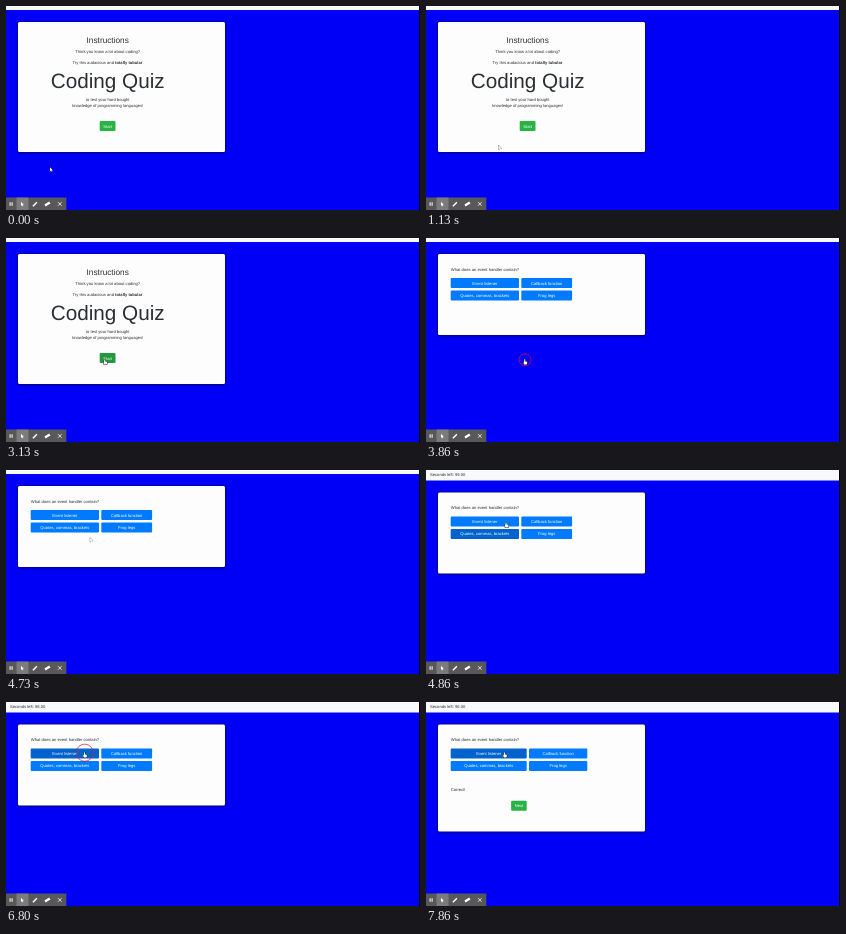
An HTML page with a canvas for the animation above (8000 ms loop, 414 by 204 pixels).

```html
<!DOCTYPE html>
<html lang="en">
<head>
<meta charset="utf-8">
<title>Coding quiz</title>
<style>
  html, body { margin: 0; width: 100%; height: 100%; overflow: hidden; background: #0000f7; }
  canvas { display: block; }
</style>
</head>
<body>
<canvas id="stage" width="414" height="204"></canvas>
<script>
const ctx = document.getElementById('stage').getContext('2d');
const LOOP = 8000;
const REM = 16 * 0.259;   // body text of the scaled-down page
const GREEN = '#28b444';

const START = 3860;       // start button released
const TICK = 4860;        // first countdown tick
const ANSWER = 6930;      // answer accepted
const OVER_START = 2200, OFF_START = 4560, OVER_ANSWER = 4740;

// Pointer moves: from, until, x, y
const moves = [
  [60, 260, 88, 120], [1060, 1200, 58, 158], [1530, 2000, 85.7, 123.7], [2050, 2330, 98.7, 121.3],
  [4530, 4820, 80, 52.3], [4930, 5580, 78, 48.3], [5660, 5860, 78.4, 50.3]
];

function pointerAt(t) {
  let x = 44, y = 161.2;
  for (const [from, until, toX, toY] of moves) {
    const k = Math.min(1, Math.max(0, (t - from) / (until - from)));
    const e = k * k * (3 - 2 * k);
    x += (toX - x) * e;
    y += (toY - y) * e;
  }
  return [x, y];
}

function text(str, x, y, { size = 1, color = '#2b2f33', align = 'left', weight = 400 } = {}) {
  ctx.font = `${weight} ${size * REM}px "Liberation Sans", Arial, sans-serif`;
  ctx.textRendering = 'geometricPrecision';
  ctx.textAlign = align;
  ctx.fillStyle = color;
  ctx.fillText(str, x, y);
  return ctx.measureText(str).width;
}

function rect(x, y, w, h, fill, r = 0) {
  ctx.beginPath();
  ctx.roundRect(x, y, w, h, r);
  ctx.fillStyle = fill;
  ctx.fill();
}

function line(x0, y0, x1, y1, width) {
  ctx.beginPath();
  ctx.moveTo(x0, y0);
  ctx.lineTo(x1, y1);
  ctx.lineWidth = width;
  ctx.stroke();
}

function button(label, x, y, w, fill) {
  rect(x, y, w, 10, fill, 1);
  text(label, x + w / 2, y + 6.4, { color: '#fff', align: 'center' });
}

function card(y, h) {
  ctx.save();
  ctx.shadowColor = 'rgba(0,0,0,.75)';
  ctx.shadowBlur = 3;
  ctx.shadowOffsetY = 0.5;
  rect(12, y, 207, h, '#fdfdfd', 1.5);
  ctx.restore();
}

function intro(t) {
  const mid = 101.7, center = { align: 'center' };
  card(16, 130);
  text('Instructions', mid, 36.7, { size: 2, align: 'center' });
  text('Think you know a lot about coding?', mid, 47, center);
  const w = text('Try this audacious and ', 66.6, 57.5);
  text('totally tubular', 66.6 + w, 57.5, { weight: 700 });
  text('Coding Quiz', mid, 82, { size: 5, align: 'center' });
  text('to test your hard bought', mid, 94.8, center);
  text('knowledge of programming languages!', mid, 101.1, center);
  button('Start', 93.7, 115.1, 15.8, t > OVER_START ? '#22993d' : GREEN);
}

function question(t) {
  const top = t < TICK ? 16 : 22.4;
  const done = t >= ANSWER;
  const hover = t < OVER_ANSWER ? -1 : t < 4930 ? 2 : 0;
  const widths = done ? [76, 58.3] : [68.3, 50.8];

  card(top, done ? 107.2 : 81);
  text('What does an event handler contain?', 24.8, top + 16.9);
  ['Event listener', 'Callback function', 'Quotes, commas, brackets', 'Frog legs'].forEach((label, i) => {
    const col = i % 2, row = i >> 1;
    const x = 24.7 + col * (widths[0] + 2.3);
    button(label, x, top + 24.1 + row * 12.4, widths[col], i === hover ? '#0062cc' : '#007bff');
  });
  if (done) {
    text('Correct!', 24.8, 88.8);
    button('Next', 85.1, 98.8, 15.6, GREEN);
  }
}

function header(t) {
  const shown = t >= TICK;
  rect(0, 0, 414, shown ? 10.4 : 4.1, '#f8f9fa');
  if (shown) text(`Seconds left: ${100 - Math.floor((t - START) / 1000)}.00`, 4, 6.3);
}

function arrow(x, y, outline) {
  ctx.beginPath();
  ctx.moveTo(x, y);
  ctx.lineTo(x + 2.8, y + 3);
  ctx.lineTo(x + 1.4, y + 3.2);
  ctx.lineTo(x, y + 4.2);
  ctx.closePath();
  ctx.strokeStyle = outline;
  ctx.lineWidth = 0.8;
  ctx.stroke();
  ctx.fillStyle = '#fff';
  ctx.fill();
  ctx.strokeStyle = '#fff';
  line(x + 1.3, y + 3, x + 1.9, y + 4.5, 0.7);
}

function hand(x, y) {
  for (const [grow, fill] of [[0.4, '#222'], [0, '#fff']]) {
    rect(x - 0.5 - grow, y - grow, 1 + 2 * grow, 4 + 2 * grow, fill, 0.5);
    rect(x - 1 - grow, y + 2.3 - grow, 3.4 + 2 * grow, 3 + 2 * grow, fill, 1);
  }
}

function toolbar() {
  rect(0, 191.6, 60.3, 12.4, '#585858');
  rect(10.5, 191.6, 12, 12.4, '#7b7b7b');
  arrow(15, 195.8, '#7b7b7b');
  line(4.1, 196.3, 4.1, 199.8, 1);
  line(6.1, 196.3, 6.1, 199.8, 1);
  line(26.9, 200.2, 30.9, 196.2, 1.5);
  line(39, 199.6, 43.8, 196.6, 2.4);
  line(52, 196.1, 55.6, 199.7, 0.8);
  line(55.6, 196.1, 52, 199.7, 0.8);
}

function ring(x, y, age) {
  if (age < 0 || age > 330) return;
  ctx.globalAlpha = 0.7 * Math.min(1, (330 - age) / 170);
  ctx.strokeStyle = '#e8102c';
  ctx.lineWidth = 1;
  ctx.beginPath();
  ctx.arc(x, y, Math.min(9, 2 + age * 0.065), 0, 7);
  ctx.stroke();
  ctx.globalAlpha = 1;
}

function pointer(t) {
  const [x, y] = pointerAt(t);
  ring(x + 0.3, y + 0.4, t - 3800);
  ring(x + 0.3, y + 0.4, t - 6700);
  if ((t > OVER_START && t < OFF_START) || t > OVER_ANSWER) hand(x, y);
  else arrow(x, y, 'rgba(0,0,0,.6)');
}

function frame(now) {
  const t = now % LOOP;
  rect(0, 0, 414, 204, '#0000f7');
  header(t);
  if (t < START) intro(t); else question(t);
  toolbar();
  rect(413, 0, 1, 204, '#000');
  pointer(t);
  requestAnimationFrame(frame);
}
requestAnimationFrame(frame);
</script>
</body>
</html>
```
